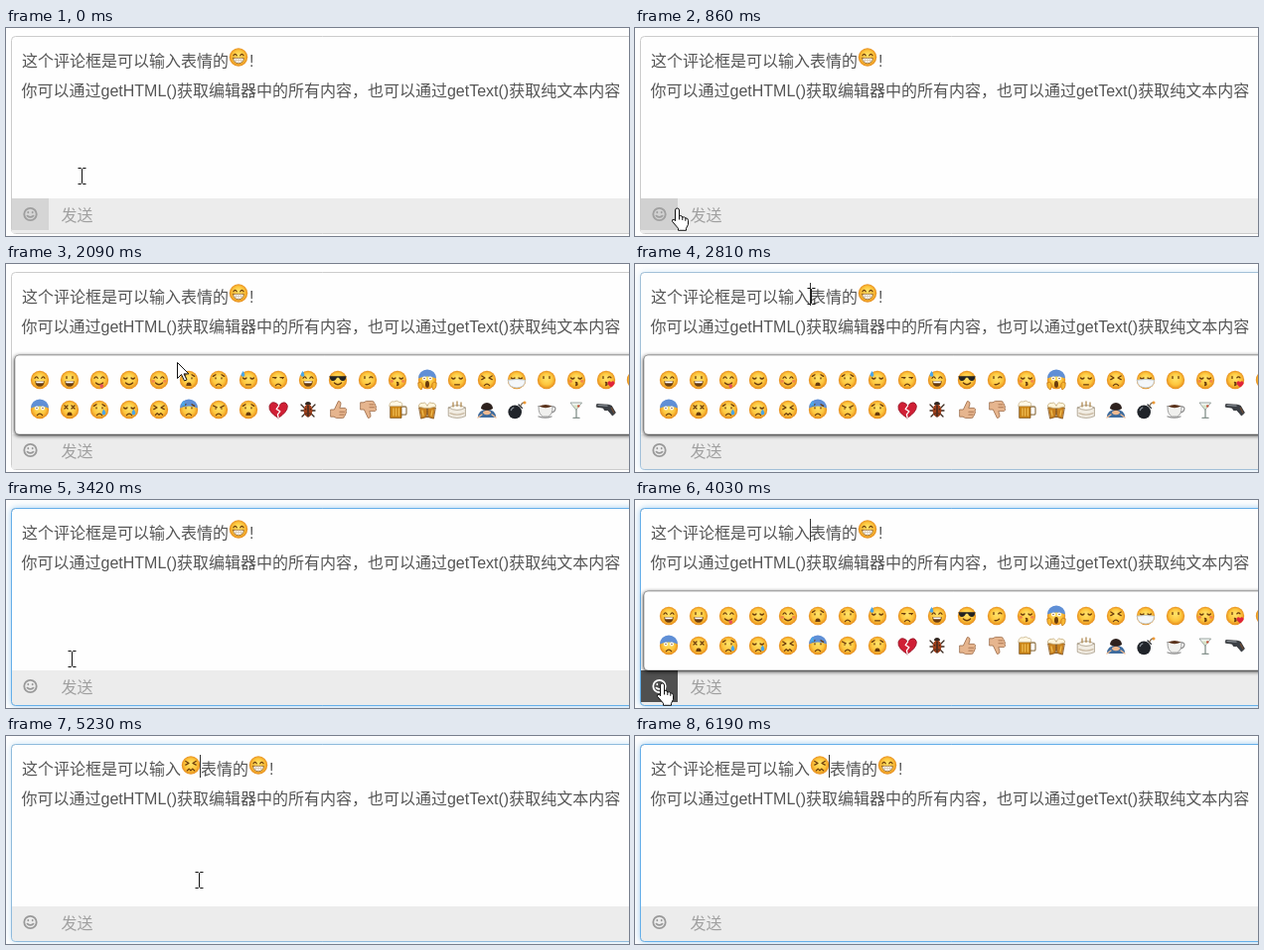
Animation of 627x210 px, one loop 6.29 s. Source, as an HTML page with a canvas:

```html
<!DOCTYPE html>
<html lang="zh-CN">
<head>
<meta charset="utf-8">
<style>
  html, body { margin: 0; width: 100%; height: 100%; overflow: hidden; background: #fefefe; }
  canvas { display: block; }
</style>
</head>
<body>
<canvas id="stage" width="627" height="210"></canvas>
<script>
const ctx = document.getElementById('stage').getContext('2d');
const LOOP = 6290;
const FONT = "300 16px 'Liberation Sans', 'Noto Sans CJK SC', 'Noto Sans CJK', sans-serif";
const PAPER = '#fefefe', BROWN = '#6a3b0c', BLUE = '#4aa6e8';

// Moments at which the interface changes
const OPEN_1 = 1470, LOADED = 1600, FOCUS = 2750, CLOSE_1 = 2900, OPEN_2 = 3910, INSERT = 5100;

// Pointer route: time, x, y
const ROUTE = [
  [0, 76, 149], [130, 77, 148], [370, 68, 153], [640, 68, 153], [860, 42, 182], [1220, 33, 188],
  [1560, 33, 188], [1780, 90, 140], [2090, 172, 99], [2450, 178, 55], [2690, 177, 32], [2900, 177, 32],
  [3150, 140, 85], [3420, 66, 160], [3560, 36, 184], [3800, 27, 185], [4100, 27, 185], [4270, 36, 174],
  [4520, 105, 152], [4760, 158, 139], [5180, 158, 139], [5450, 350, 170], [5710, 535, 195],
  [5830, 552, 199], [5950, 556, 214], [LOOP, 556, 240]
];

// Darkness of the smiley button: time, level
const HOVER = [
  [0, .15], [370, 0], [800, 0], [1150, 1], [1620, 1], [1980, 0],
  [3500, 0], [3800, 1], [4250, 1], [4600, 0], [LOOP, 0]
];

// Strength of the blue focus ring: time, level
const RING = [
  [0, 0], [FOCUS, 0], [FOCUS + 150, 1], [INSERT, 1], [INSERT + 60, .3], [INSERT + 240, 1], [LOOP, 1]
];

// Drawing layers in a 20-unit box around 0,0: path, fill, stroke
const line = path => [[path, null, BROWN]];
const PARTS = {
  dot: line('M-3-3.4v1.8M3-3.4v1.8'),
  arc: line('M-5-1.8q1.6-2.8 3.2 0M1.8-1.8q1.6-2.8 3.2 0'),
  shut: line('M-5.4-2q1.7 2 3.4 0M2-2q1.7 2 3.4 0'),
  squint: line('M-5.2-4l3.2 2-3.2 1.6M5.2-4l-3.2 2 3.2 1.6'),
  cross: line('M-5-4l3 3m0-3l-3 3M2-4l3 3m0-3l-3 3'),
  side: line('M-5.4-2.4h3.4M2-2.4h3.4M-3-1.8v.4M4.4-1.8v.4'),
  wink: line('M-3-3.4v1.8M1.8-2.2q1.6-2 3.2 0'),
  angry: line('M-5.4-4l3.6 1.8M5.4-4l-3.6 1.8M-3-1.2v.4M3-1.2v.4'),
  worry: line('M-5.6-3.6l2.6-1.6M5.6-3.6l-2.6-1.6M-3-2v.8M3-2v.8'),
  wide: [['M-5-1.6a2 2 0 1 0 4 0a2 2 0 1 0-4 0M1-1.6a2 2 0 1 0 4 0a2 2 0 1 0-4 0', '#fff'],
    ['M-3-1.6v.2M3-1.6v.2', null, BROWN]],
  smile: line('M-3.6 3q3.6 3.4 7.2 0'),
  smirk: line('M-2 4.6q3 .6 4.6-1.4'),
  open: [['M-4.8 1.2h9.6q-.6 5.6-4.8 5.6t-4.8-5.6z', BROWN], ['M-4 1.6h8l-.6 1.6h-6.8z', '#fff']],
  grin: [['M-5.4 .8h10.8q-.8 5.4-5.4 5.4t-5.4-5.4z', '#fff', '#8a5414'],
    ['M-4.8 3.2h9.6M-2.4 1v4.4M0 1v5M2.4 1v4.4', '#fff', '#d3c4ac']],
  frown: line('M-2.6 5.6q2.6-2.8 5.2 0'),
  flat: line('M-2.4 4.8h4.8'),
  gape: [['M-2.6 6q0-3.4 2.6-3.4t2.6 3.4z', BROWN]],
  zigzag: line('M-3.6 5.4l1.8-1.8 1.8 1.8 1.8-1.8 1.8 1.8'),
  kiss: line('M-.6 2.4q3 .6.2 1.6q3 .8 0 1.6'),
  tongue: [['M.4 4.4h3.4q.6 3.6-1.4 3.6t-2-3.6z', '#e8545c']],
  blush: [['M-7.6 1.4a1.8 1.4 0 1 0 3.6 0a1.8 1.4 0 1 0-3.6 0M4 1.4a1.8 1.4 0 1 0 3.6 0a1.8 1.4 0 1 0-3.6 0', '#f2864a']],
  drop: [['M-5.4-9q3.4 5 .2 5.8q-4.4-.4-.2-5.8z', BLUE]],
  tear: [['M4.4-.4q3.6 5 .2 6q-4-.6-.2-6z', BLUE]],
  blue: [['M-9-1.6a9 9 0 0 1 18 0q-9-4-18 0z', '#5f8fd6']],
  scream: [['M-2 4.4a2 3.4 0 1 0 4 0a2 3.4 0 1 0-4 0', BROWN],
    ['M-9 3q3-2 4 1t-1 6q-4-2-3-7zM9 3q-3-2-4 1t1 6q4-2 3-7z', '#f7b733', '#c67a16']],
  shades: [['M-8.6-3.8h17.2l-1 3.2q-2.4 3-5.6 0l-1-1.6h-2l-1 1.6q-3.2 3-5.6 0z', '#222']],
  mask: [['M-8.6 .2q8.6-1.6 17.2 0-.2 4-2.6 6-6 3.6-12 0-2.4-2-2.6-6z', '#f4f7fa', '#b9c4cc']],
  heart: [['M5 7.4q-5-3.4-3-5.6 2-1.2 3 .8 1-2 3-.8 2 2.2-3 5.6z', '#e0243a']]
};

const OBJECTS = {
  broken: [['M0 8.5q-10-6-9-12 2-6 7.6-2.6l2 3 2-3q5.4-3 6.8 2.6 0 6-9.4 12z', '#d01f35', '#8e1424'],
    ['M.6-4l-2.4 3.4 3.6 2.4-2.4 3 .8 3.6', null, '#fff']],
  bug: [['M-7-5l3 3M7-5l-3 3M-7 1h14M-6 7l3-3M6 7l-3-3', null, '#3a2a20'],
    ['M-4.4 1a4.4 6.5 0 1 0 8.8 0a4.4 6.5 0 1 0-8.8 0', '#a0401c'],
    ['M-3-5a3 3 0 1 1 6 0z', '#33261f'], ['M0-4v11M-2.4-.4v.2M2.4-.4v.2M-2 4v.2M2 4v.2', null, '#33261f']],
  thumb: [['M-7 0h3.4l4-8.4q3.6-.2 2.2 4.4l-.8 2.4h5.6q2 1 .8 3 .8 1.6-.4 2.8.2 1.8-1.2 2.4-.4 2-2 2h-6l-2.6-1.4h-3z', '#e6b58e', '#9a6844'],
    ['M2 2.4h4.4M2 5.2h4', null, '#b98560']],
  beer: [['M4-3h3.6q1.4 0 1.4 1.6v5q0 1.6-1.4 1.6h-3.6', null, '#9a8058'],
    ['M-7-5h11v13.4h-11z', '#c98418', '#7d5014'],
    ['M-4-1v7M-1.4-1v7M1.4-1v7', null, '#f0bc50'], ['M-8-5q1-4 4.6-3 3-2 5 .4 4 0 3 4h-12.6z', '#fff8e6', '#c8b48c']],
  cheers: [['M-8-2l7-1 2 10-7 2zM8-2l-7-1-2 10 7 2z', '#c88220', '#7d4c14'],
    ['M-5 1l1 5M5 1l-1 5', null, '#f0bc50'],
    ['M-8.6-3q0-4 4-3.6 2-1.4 4 1.4l.6 1.6.6-1.6q2-3 4-1.4 4-.4 4 3.6l-6 1.4h-5z', '#fff5dc', '#c0a878']],
  cake: [['M-8.4-2h16.8v8.6q-8.4 3.8-16.8 0z', '#f1ece2', '#a59884'], ['M-8.4-2q8.4-5 16.8 0 -8.4 5-16.8 0z', '#fffdf6', '#a59884'],
    ['M-4-3v-4M0-3.6v-4.4M4-3v-4', null, '#b08a52'], ['M-7 3.6q7 3 14 0', null, '#cbbba4']],
  bow: [['M-9 8q0-8 9-8t9 8z', '#3f6c9e'], ['M-6-1a6 6 0 1 1 12 0q-6 4-12 0z', '#2d211d'],
    ['M-4 2.2a4 3 0 1 0 8 0q-4-3-8 0z', '#efba90'], ['M-9 8l4-3M9 8l-4-3', null, '#efba90']],
  bomb: [['M-8.6 2.4a6.8 6.8 0 1 0 13.6 0a6.8 6.8 0 1 0-13.6 0', '#20242a'], ['M2-5l3.4 3.4', null, '#20242a'],
    ['M4-4q1.4-3.4 4-3', null, '#8a7760'], ['M8-8v2M7-7h2', null, '#f0962a'], ['M-5.6.6q.8-2 2.4-2.6', null, '#8a929a']],
  coffee: [['M5-3q5-.4 3.6 3.4-1 2.6-4.6 2.4', null, '#8d8d8d'], ['M-8 7q7 2.4 13 0', null, '#8d8d8d'],
    ['M-8-3.4h14q.6 8.4-4.6 10.4h-4.8q-5-2-4.6-10.4z', '#f0f0ee', '#8d8d8d'], ['M-7.4-3.4q6.4-3.4 12.8 0-6.4 3.4-12.8 0z', '#5a321b']],
  cocktail: [['M-5.6-7h11.2l-5.6 7z', '#f2f6f3', '#84918c'], ['M-3.6-4.6h7.2l-3.6 4z', '#d5e2c6'],
    ['M0 0v8M-3 8.4h6', null, '#84918c'], ['M1-3.6a1.2 1.2 0 1 0 2.4 0a1.2 1.2 0 1 0-2.4 0', '#c2503a']],
  pistol: [['M-9-5.4l11 .6 3.4 1 4 7-3 2.8-4.6-5.4h-3.4l-1.2-2.4-6.6-1z', '#3b3f45', '#202326'],
    ['M-8-4.4l9 .6', null, '#8a9096'], ['M5.4-1.6l2.4 4.6', null, '#6d4a34']]
};

const PALETTE = [
  ['arc open', 'dot open', 'arc smile tongue', 'shut smile', 'arc smile blush', 'worry gape', 'worry frown',
    'shut flat drop', 'side frown', 'arc open drop', 'smile shades', 'wink smirk', 'shut kiss blush',
    'blue wide scream', 'shut flat', 'squint frown', 'shut mask', 'dot', 'shut kiss blush', 'wink kiss heart', 'arc kiss'],
  ['blue wide frown', 'cross gape', 'worry frown tear', 'shut frown tear', 'squint zigzag', 'blue worry frown drop',
    'angry frown', 'worry gape', 'broken', 'bug', 'thumb', 'thumbDown', 'beer', 'cheers', 'cake', 'bow', 'bomb',
    'coffee', 'cocktail', 'pistol']
];

const CURSORS = {
  arrow: 'M0 0v16l4-4 3 6.4 2.5-1-3-6h5z',
  hand: 'M-2 1.5a2 2 0 0 1 4 0v6l1-.5q2 0 2.3 1.5q2-.6 3 .8q2.7 0 2.7 2.5v4l-2 4v2h-8v-2l-6-7q-.5-2.5 2-2l1 1.5z',
  beam: 'M-4-8h3l1 1 1-1h3M0-7v14M-4 8h3l1-1 1 1h3'
};

const paths = {};
const pathOf = d => paths[d] ||= new Path2D(d);

// Linear value between keys; every key is [time, ...values]
function track(keys, t, index = 1) {
  const next = Math.max(1, keys.findIndex(key => key[0] > t));
  const a = keys[next - 1], b = keys[next];
  return a[index] + (b[index] - a[index]) * (t - a[0]) / (b[0] - a[0]);
}

function at(x, y, draw) {
  ctx.save();
  ctx.translate(x, y);
  draw();
  ctx.restore();
}

function faded(alpha, draw) {
  ctx.save();
  ctx.globalAlpha = alpha;
  draw();
  ctx.restore();
}

function paint(layers) {
  for (const [d, fill, stroke] of layers) {
    if (fill) { ctx.fillStyle = fill; ctx.fill(pathOf(d)); }
    if (stroke) {
      ctx.lineWidth = fill ? .8 : 1.3;
      ctx.strokeStyle = stroke;
      ctx.stroke(pathOf(d));
    }
  }
}

function emoji(name, x, y) {
  at(x, y, () => {
    ctx.lineCap = ctx.lineJoin = 'round';
    if (name === 'thumbDown') { ctx.scale(1, -1); name = 'thumb'; }
    if (OBJECTS[name]) return paint(OBJECTS[name]);
    const skin = ctx.createRadialGradient(0, -2, 1, 0, 0, 9.4);
    skin.addColorStop(0, '#ffe066');
    skin.addColorStop(.6, '#fdc53c');
    skin.addColorStop(1, '#e58a1c');
    ctx.fillStyle = skin;
    ctx.beginPath();
    ctx.arc(0, 0, 9.2, 0, 7);
    ctx.fill();
    name.split(' ').forEach(part => paint(PARTS[part]));
  });
}

function text(string, x, y, color = '#555') {
  ctx.font = FONT;
  ctx.fillStyle = color;
  ctx.fillText(string, x, y);
}

function panel(x, y, w, h, stroke, shadow, blur, drop = 0) {
  ctx.save();
  ctx.beginPath();
  ctx.roundRect(x, y, w, h, 4);
  ctx.shadowColor = shadow;
  ctx.shadowBlur = blur;
  ctx.shadowOffsetY = drop;
  ctx.fillStyle = PAPER;
  ctx.fill();
  ctx.shadowColor = 'transparent';
  ctx.strokeStyle = stroke;
  ctx.stroke();
  ctx.restore();
}

function smiley(color) {
  at(24.5, 188, () => {
    ctx.strokeStyle = color;
    ctx.lineWidth = 1.8;
    ctx.lineCap = 'round';
    ctx.beginPath();
    ctx.arc(0, 0, 6.2, 0, 7);
    ctx.stroke();
    ctx.stroke(pathOf('M-2.2-2v.3M2.2-2v.3M-3 1.6q3 2.6 6 0'));
  });
}

function editor(t) {
  const ring = track(RING, t), hover = track(HOVER, t);
  panel(5.5, 8.5, 700, 199, '#ccc', `rgba(102,175,233,${.7 * ring})`, 7);
  ctx.fillStyle = '#ececec';
  ctx.fillRect(6, 172, 621, 35);
  faded(ring, () => {
    ctx.strokeStyle = '#66afe9';
    ctx.beginPath();
    ctx.roundRect(5.5, 8.5, 700, 199, 4);
    ctx.stroke();
  });

  smiley('#999');
  faded(hover, () => {
    ctx.fillStyle = '#505050';
    ctx.fillRect(6, 172, 37, 32);
    smiley('#fff');
  });
  text('发送', 55.5, 194.5, '#a0a0a0');

  const inserted = t >= INSERT, shift = inserted ? 20 : 0;
  text('这个评论框是可以输入', 16, 39);
  if (inserted) emoji('squint zigzag', 186, 29.5);
  text('表情的', 176 + shift, 39);
  emoji('arc grin', 234 + shift, 29.5);
  text('!', 245 + shift, 39);
  text('你可以通过getHTML()获取编辑器中的所有内容，也可以通过getText()获取纯文本内容', 15.5, 69);

  const since = t - (inserted ? INSERT : FOCUS);
  if (since >= 0 && since % 1060 < 530) {
    ctx.fillStyle = '#333';
    ctx.fillRect(inserted ? 195 : 176, 19, 1, 23);
  }
}

const isOpen = t => (t >= OPEN_1 && t < CLOSE_1) || (t >= OPEN_2 && t < INSERT);

function popup(t) {
  panel(9, 92, 700, 80, 'rgba(0,0,0,.3)', 'rgba(0,0,0,.9)', 4, 1);
  if (t < LOADED) return;
  PALETTE.forEach((row, r) => row.forEach((name, i) => emoji(name, 34 + 30 * i, 117 + 30 * r)));
}

function cursorKind(x, y, open) {
  if (y >= 172) return x < 43 ? 'hand' : 'arrow';
  if (!open || y < 91) return 'beam';
  const overCell = Math.abs((x - 19) % 30 - 15) < 10 && Math.abs((y - 102) % 30 - 15) < 10 && y > 102 && y < 162;
  return overCell ? 'hand' : 'arrow';
}

function pointer(t) {
  const x = Math.round(track(ROUTE, t, 1)), y = Math.round(track(ROUTE, t, 2));
  const kind = cursorKind(x, y, isOpen(t));
  at(x + .5, y + .5, () => {
    ctx.lineWidth = 1;
    ctx.strokeStyle = '#111';
    ctx.fillStyle = '#fff';
    if (kind !== 'beam') ctx.fill(pathOf(CURSORS[kind]));
    ctx.stroke(pathOf(CURSORS[kind]));
    if (kind === 'hand') ctx.stroke(pathOf('M2 7v4M5.3 8.5v3M8.3 9.3v3'));
  });
}

function draw() {
  const t = performance.now() % LOOP;
  ctx.fillStyle = PAPER;
  ctx.fillRect(0, 0, 627, 210);
  editor(t);
  if (isOpen(t)) popup(t);
  pointer(t);
  requestAnimationFrame(draw);
}
draw();
</script>
</body>
</html>
```
